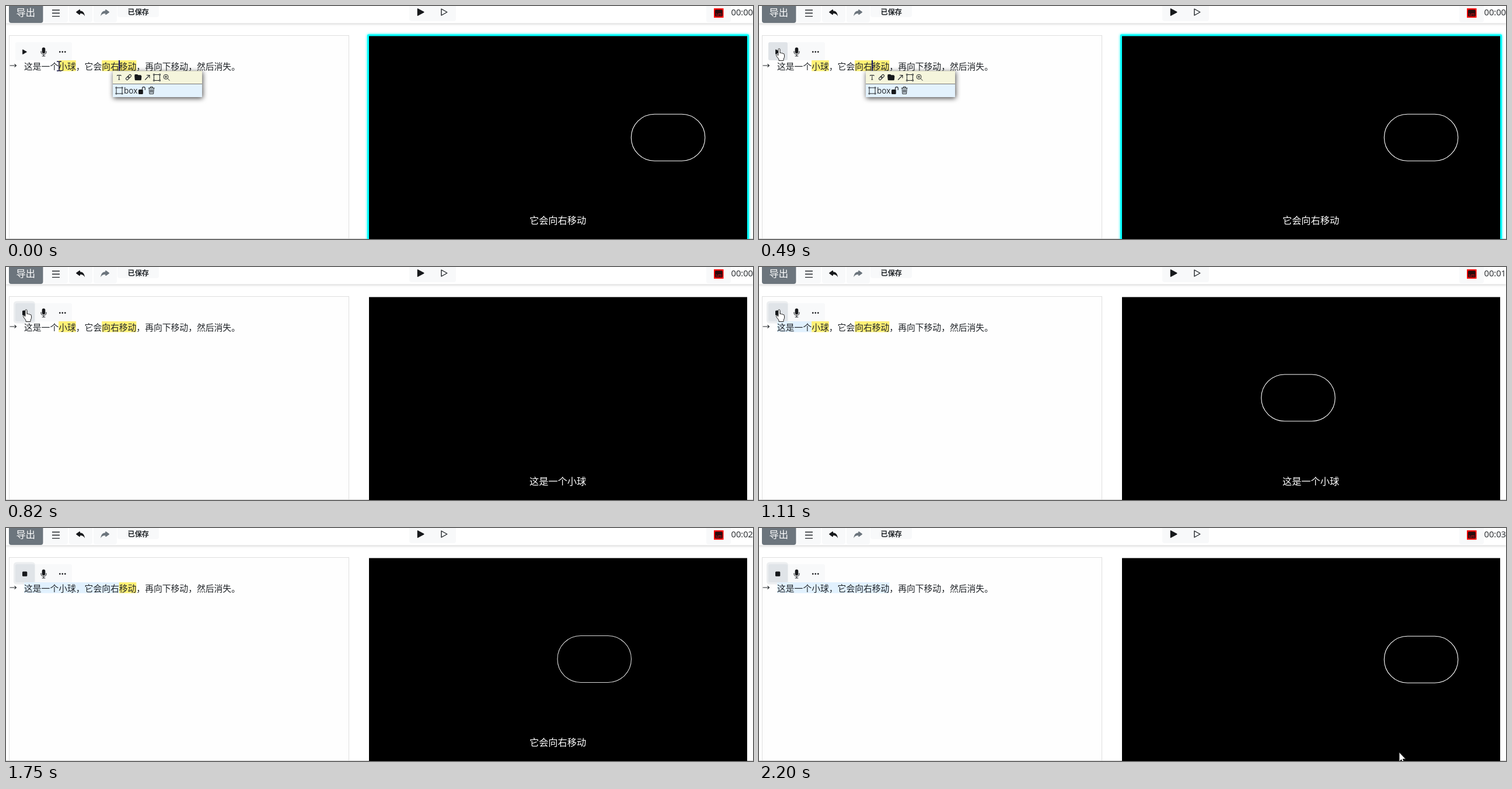
These frames come from a looping animation (1280x399 px, 2280 ms). An HTML page:

```html
<!DOCTYPE html>
<html lang="zh-CN">
<head>
<meta charset="utf-8">
<title>Script editor</title>
<style>
  html, body { margin: 0; width: 100%; height: 100%; overflow: hidden; background: #fff; }
  svg { display: block; }
  text { font-family: "Noto Sans CJK SC", "Noto Sans CJK", sans-serif; fill: #212529; }
  .latin { font-family: "Open Sans", "Noto Sans", sans-serif; }
  .line { fill: none; stroke: #212529; }
  .soft { fill: #f8f9fa; }
  .ink { fill: #16181b; }
  #popup { filter: drop-shadow(1px 2px 4px #000b); }
  #header { filter: drop-shadow(0 1px 2px #0003); }
  #glow { filter: drop-shadow(0 0 2px #0ff); }
</style>
</head>
<body>
<svg width="1280" height="399" viewBox="0 0 1280 399">
  <defs>
    <path id="reply" d="M5.9 11.9 1.35 8.6a.72.72 0 0 1 0-1.2L5.9 4.1A.72.72 0 0 1 7 4.7V6c1.5 0 6 0 7 8-2.5-4.5-7-4-7-4v1.3c0 .56-.6.9-1.1.6z"/>
    <g id="frame" class="line">
      <path d="M3 1.5h7M3 11.5h7M1.5 3v7M11.5 3v7"/>
      <path d="M.5.5h2v2h-2zM10.5.5h2v2h-2zM.5 10.5h2v2h-2zM10.5 10.5h2v2h-2z" stroke-width=".9"/>
    </g>
  </defs>

  <g id="header">
    <rect y="-10" width="1280" height="39.5" fill="#fff"/>
  </g>
  <g class="soft">
    <rect x="65" y="-5" width="41" height="33" rx="4"/>
    <rect x="108" y="-5" width="40" height="33" rx="4"/>
    <rect x="150" y="-5" width="40" height="33" rx="4"/>
    <rect x="191" y="-5" width="71" height="24" rx="4"/>
    <rect x="691" y="-5" width="80" height="31" rx="4"/>
    <rect x="1200" y="-5" width="42" height="33" rx="4"/>
  </g>
  <rect x="5" y="-10" width="58.5" height="39" rx="4" fill="#6c757d"/>
  <text x="17.5" y="17" font-size="16.3" style="fill:#fff">导出</text>
  <path class="line" stroke-width="1.4" d="M79 7h13M79 12.3h13M79 17.6h13"/>
  <use href="#reply" class="ink" transform="translate(119 1.3) scale(1.15)"/>
  <use href="#reply" fill="#6c757d" transform="translate(178.2 1.3) scale(-1.15 1.15)"/>
  <text x="208.5" y="14.7" font-size="12.2" font-weight="700">已保存</text>
  <path class="ink" stroke="#16181b" stroke-linejoin="round" stroke-width="1.5" d="M705.5 4.8v11.4l10.3-5.7z"/>
  <path class="line" stroke-linejoin="round" stroke-width="1.4" d="M746 5v11l9.8-5.5z"/>
  <rect x="1213" y="4" width="16.5" height="16" fill="#f00"/>
  <rect x="1214.8" y="6.3" width="13" height="11.5" rx="1.5" fill="#2a0a0c"/>
  <path stroke="#d01018" d="M1216.5 13.3h2M1220 13.3h6M1216.5 15.7h6M1224 15.7h2"/>
  <text id="clock" class="latin" x="1242.5" y="16" font-size="14.7"></text>

  <rect x="5.5" y="50.5" width="582" height="360" fill="#fefefe" stroke="#dfdfdf"/>
  <rect class="soft" x="16" y="62" width="97" height="31" rx="3"/>
  <rect id="ring" x="13" y="58.5" width="37" height="38" rx="5" fill="#eceef0"/>
  <rect id="hover" y="62" width="33" height="31" rx="3" fill="#e0e4e8"/>
  <path id="play" class="ink" stroke="#16181b" stroke-linejoin="round" d="M28.7 74.8v7.6l6.7-3.8z"/>
  <rect id="stop" class="ink" x="28" y="74.5" width="8.3" height="8.3" rx="1.5"/>
  <rect class="ink" x="61.7" y="71" width="5.6" height="10.2" rx="2.8"/>
  <path class="line" stroke-width="1.1" d="M60 77.3v1.2a4.5 4.5 0 0 0 9 0v-1.2M64.5 83v3M61.7 85.8h5.6"/>
  <path stroke="#16181b" stroke-width="2.8" stroke-linecap="round" stroke-dasharray="0 4.5" d="M92.3 78.6h9.2"/>
  <path class="line" stroke-width="1.1" d="M6.5 102h11M14.6 99.3l2.9 2.7-2.9 2.7"/>

  <g id="marks"></g>
  <text x="31" y="109.2" font-size="14.8">这是一个小球，它会向右移动，再向下移动，然后消失。</text>
  <g id="popup">
    <rect x="183" y="111" width="153" height="22.5" fill="#f5f5dc"/>
    <rect x="183" y="134" width="153" height="22" fill="#e3f2fd"/>
  </g>
  <g id="tools">
    <rect x="183" y="111" width="153" height="1" fill="#d8d8c4"/>
    <rect x="183" y="133" width="153" height="1" fill="#777"/>
    <rect x="193" y="93" width="2" height="18" fill="#101060"/>
    <path class="line" d="M190.5 120v-1.5h6.5v1.5M193.8 118.5v7.5M192.3 126h3"/>
    <g class="line" transform="translate(210 122) rotate(-45)" stroke-width="1.1">
      <rect x="-5.6" y="-2" width="6.5" height="4" rx="2"/>
      <rect x="-.9" y="-2" width="6.5" height="4" rx="2"/>
    </g>
    <path class="ink" d="M220.5 118q0-1 1-1h3.6l1.5 1.3h4q1 0 1 1l.8.9-.6 6q-.1 1-1 1h-9q-1 0-1-1l-.6-6z"/>
    <path class="line" stroke-width="1.1" d="M238.3 126.5l7.5-7.8M241 118.5h5v5"/>
    <use href="#frame" x="252" y="116"/>
    <g class="line"><circle cx="274" cy="121.3" r="4"/><path d="M277 124.3l3.5 3.5M271.8 121.3h4.4M274 119.1v4.4"/></g>
    <use href="#frame" x="187.5" y="138.5"/>
    <text class="latin" x="202" y="150.3" font-size="13.6">box</text>
    <rect class="ink" x="227" y="143" width="7.8" height="8" rx="1.5"/>
    <path class="line" stroke-width="1.1" d="M233.5 143.5v-2.5a2.4 2.4 0 0 1 4.8 0v3"/>
    <path class="line" d="M244 140.5h10.5M247.3 140v-1.5h4V140M245.2 141l.7 9.5h6.7l.7-9.5M247.5 142.5v6M249.3 142.5v6M251.1 142.5v6"/>
  </g>

  <rect y="398" width="1280" height="1" fill="#cfcfcf"/>
  <rect id="glow" x="619" y="48.5" width="654" height="370" rx="2" fill="#0ff"/>
  <rect x="622" y="51.5" width="648" height="348" fill="#000"/>
  <rect id="ball" width="126.5" height="80" rx="40" fill="none" stroke="#fff" stroke-width="1.1"/>
  <text id="caption" x="897" y="373.3" font-size="16.2" style="fill:#fff"></text>

  <g id="beam" fill="none" stroke="#15154a" stroke-width="1.6">
    <path d="M-4-8h3l1 1 1-1h3M0-7V7M-4 8h3l1-1 1 1h3"/>
  </g>
  <path id="hand" fill="#fff" stroke="#222" stroke-linejoin="round"
    d="M-1.5 11V1a1.5 1.5 0 0 1 3 0v6q1.3-1.2 2.6.4 1.4-.8 2.5.6 2.4-.4 2.4 2.2v4l-1.5 3.3V20H-.5v-2.3L-4.7 12q-1-2 .8-2.3z"/>
  <path id="pointer" fill="#fff" stroke="#222" d="M0 0V16l3.7-3.4 2.5 5.8 2.5-1-2.5-5.6h5z"/>
</svg>
<script>
const LOOP = 2280, CHAR = 14.8;
const $ = id => document.getElementById(id);
const show = (id, on) => $(id).style.display = on ? '' : 'none';
const clamp = v => Math.min(1, Math.max(0, v));
const mix = (a, b, p) => a + (b - a) * p;
const steps = (t, start, size, count) => clamp(Math.floor((t - start) / size) / count);

// Spoken phrases: first character, length, time read, tagged in yellow
const phrases = [
  [0, 4, 890, false], [4, 2, 1200, true], [6, 3, 1440, false],
  [9, 2, 1750, true], [11, 2, 2200, true]
].map(([at, length, read, tagged]) => {
  const el = document.createElementNS('http://www.w3.org/2000/svg', 'rect');
  const box = { x: 31 + at * CHAR, y: 93, width: length * CHAR, height: 18.5 };
  for (const k in box) el.setAttribute(k, box[k]);
  $('marks').append(el);
  return { el, read, tagged };
});

function cursorAt(t) {
  if (t < 1440) {
    const p = steps(t, 46, 74, 6);
    const x = mix(91, 34.5, p), y = mix(103, 73.5, p);
    return [y < 93 ? 'hand' : 'beam', x, y];
  }
  if (t < 1516) return ['pointer', 78, 174];
  if (t < 1592) return ['pointer', 150, 370];
  return ['pointer', 1097, t < 2200 ? 420 : 384];
}

function captionAt(t) {
  if (t < 820) return '它会向右移动';
  if (t < 1200) return '这是一个小球';
  return t >= 1440 && t < 2200 ? '它会向右移动' : '';
}

function draw(t) {
  const playing = t >= 820;
  show('glow', t < 720);
  show('popup', !playing);
  show('tools', !playing);
  show('play', !playing);
  show('stop', playing);
  show('ring', playing);

  for (const { el, read, tagged } of phrases)
    el.setAttribute('fill', playing && t >= read ? '#e1f1fe' : tagged ? '#fff176' : 'none');

  const [kind, x, y] = cursorAt(t);
  for (const id of ['beam', 'hand', 'pointer']) show(id, id === kind);
  $(kind).setAttribute('transform', `translate(${x} ${y})`);
  show('hover', playing || kind === 'hand');
  $('hover').setAttribute('x', playing || x < 49 ? 16 : 48);

  const move = playing ? steps(t, 1440, 76, 10) : 1;
  show('ball', t < 820 || t >= 890);
  $('ball').setAttribute('x', mix(860.7, 1071.3, move));
  $('ball').setAttribute('y', mix(184, 185.2, move));
  $('ball').setAttribute('stroke-opacity', t >= 1440 && t < 2200 ? .85 : 1);

  $('caption').textContent = captionAt(t);
  $('clock').textContent = '00:0' + [1110, 1440, 2120].filter(s => t >= s).length;
}

const begin = performance.now();
function tick() {
  draw((performance.now() - begin) % LOOP);
  requestAnimationFrame(tick);
}
tick();
</script>
</body>
</html>
```
